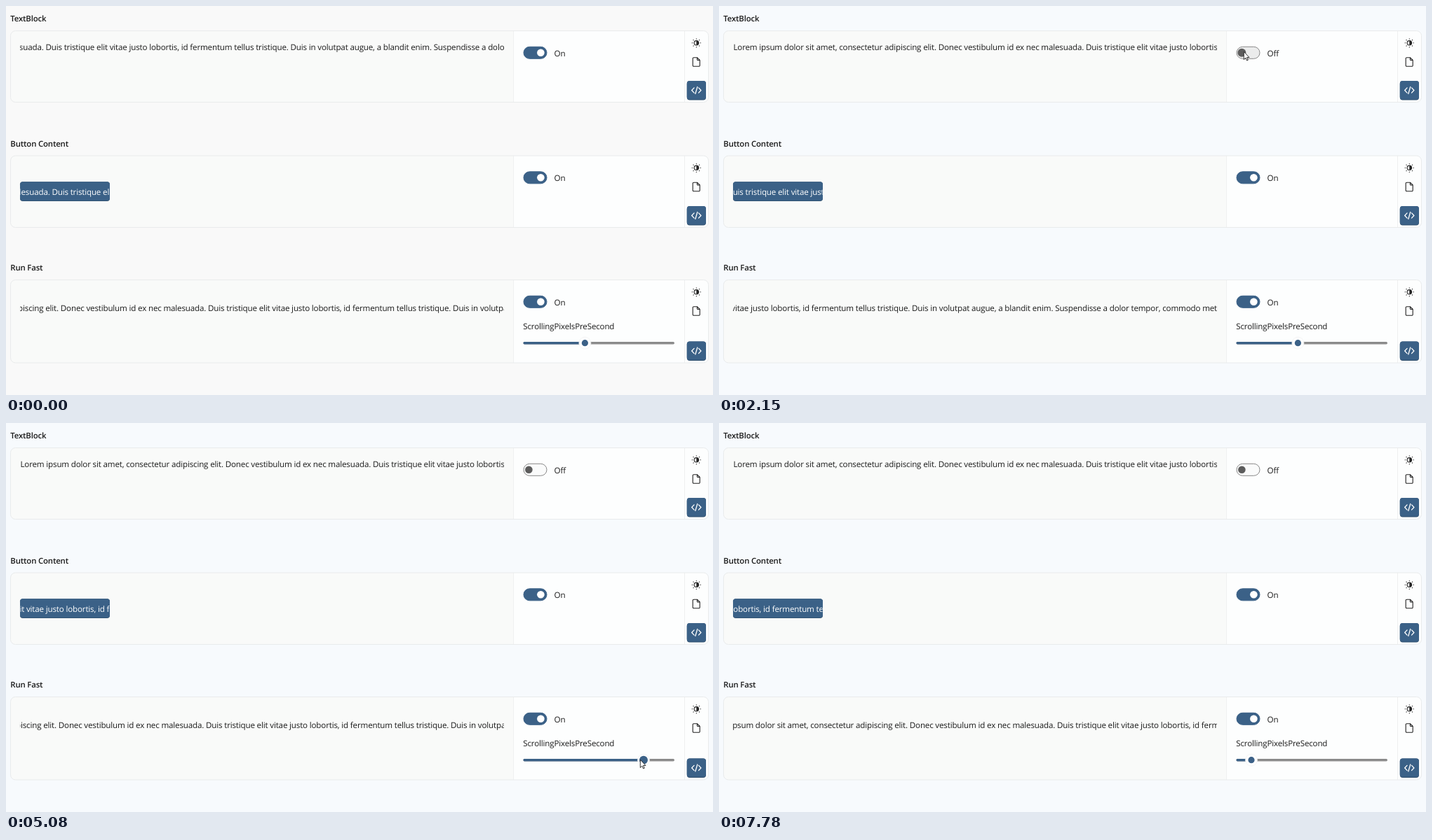
These frames come from a looping animation (1008x556 px, 7850 ms). An HTML page:

```html
<!DOCTYPE html>
<html lang="en">
<head>
<meta charset="utf-8">
<title>Scrolling text</title>
<style>
  html, body { margin: 0; width: 100%; height: 100%; overflow: hidden; background: #f9f9f9; }
  svg { display: block; width: 1008px; height: 556px; }
  text { font: 11.6px "Open Sans", "Noto Sans", sans-serif; letter-spacing: -.165px; fill: #1b1b1b; text-rendering: geometricPrecision; white-space: pre; }
  .title { font-size: 11.4px; font-weight: 600; }
  .light { fill: #fff; }
  .tip { font-size: 12.5px; text-anchor: middle; }
  .line { fill: none; stroke: #222; stroke-width: 1.1; stroke-linejoin: round; stroke-linecap: round; }
</style>
</head>
<body>
<svg id="stage" viewBox="0 0 1008 556"></svg>
<script>
const LOOP = 7850;
const ACCENT = '#3b6187';
const ACCENT_HOVER = '#4b6e91';
const REST_X = 20.5;
const PX_PER_UNIT = 0.842;
const TOGGLE_AT = 1500;
const TRACK = { x: 737.5, y: 480, height: 3.4, rx: 1.7 };
const PASSAGE = 'Lorem ipsum dolor sit amet, consectetur adipiscing elit. Donec vestibulum id ex nec malesuada. ' +
  'Duis tristique elit vitae justo lobortis, id fermentum tellus tristique. Duis in volutpat augue, a blandit enim. ' +
  'Suspendisse a dolor tempor, commodo metus vel, dapibus nisl. Nulla id sapien at arcu pretium aliquet. ' +
  'Sed vitae lectus non nibh gravida porta.';

const easeInOut = p => (1 - Math.cos(Math.PI * p)) / 2;
const easeOut = p => Math.sin(Math.PI * p / 2);
const ramp = (t, from, to) => Math.min(1, Math.max(0, (t - from) / (to - from)));
const pulse = (t, from, to, fade = 100) => ramp(t, from, from + fade) - ramp(t, to, to + fade);
const within = (t, from, to) => t >= from && t < to;

const SLIDER_START = 825.4;
const DRAGS = [
  { press: 3540, from: 3700, to: 4390, release: 4620, x: 909, ease: easeInOut },
  { press: 5240, from: 5400, to: 6350, release: 6480, x: 759, ease: easeOut }
];
const POINTER_START = { x: 760, y: 497 };
const POINTER_MOVES = [
  { from: 140, to: 620, x: 708, y: 170 },
  { from: 620, to: 1150, x: 748, y: 65 },
  { from: 2200, to: 2800, x: SLIDER_START - 5, y: 481 }
];

const stage = document.getElementById('stage');

function set(node, attrs) {
  for (const name in attrs) node.setAttribute(name, attrs[name]);
}

function add(tag, attrs, parent = stage, content) {
  const node = document.createElementNS('http://www.w3.org/2000/svg', tag);
  set(node, attrs);
  if (content) node.textContent = content;
  parent.append(node);
  return node;
}

function label(x, y, content, cls = '', parent = stage) {
  return add('text', { x, y, class: cls }, parent, content);
}

function place(node, x, y) {
  node.setAttribute('transform', `translate(${x} ${y})`);
}

function marquee(id, x, width, baseline, cls) {
  const clip = add('clipPath', { id });
  add('rect', { x, y: baseline - 16, width, height: 24 }, clip);
  const group = add('g', { 'clip-path': `url(#${id})` });
  return label(0, baseline, PASSAGE, cls, group);
}

function accentBox(x, y, width, height, parent) {
  add('rect', { x, y, width, height, rx: 4, fill: '#2f4e6d' }, parent);
  add('rect', { x, y, width, height: height - 0.8, rx: 4, fill: ACCENT }, parent);
}

function toggle(cy) {
  return {
    track: add('rect', { x: 738, y: cy - 8.5, width: 33, height: 17, rx: 8.5, fill: ACCENT, stroke: ACCENT }),
    knob: add('circle', { cx: 762.4, cy, r: 5.3, fill: '#fff' }),
    text: label(781.6, cy + 5.1, 'On')
  };
}

function icons(top, bottom) {
  const sun = add('g', { transform: `translate(984.3 ${top + 17.3})` });
  add('circle', { r: 3.2, class: 'line' }, sun);
  add('path', { d: 'M0-3.2A3.2 3.2 0 0 1 0 3.2Z', fill: '#222' }, sun);
  for (let angle = 0; angle < 360; angle += 45) {
    add('path', { d: 'M0-5.7V-6.1', class: 'line', transform: `rotate(${angle})` }, sun);
  }
  add('path', {
    d: 'M-3.7-6.3H1.2L5-2.5V5A1.3 1.3 0 0 1 3.7 6.3H-3.7A1.3 1.3 0 0 1-5 5V-5A1.3 1.3 0 0 1-3.7-6.3ZM1.2-6.3V-3.5A1 1 0 0 0 2.2-2.5H5',
    class: 'line', transform: `translate(984.2 ${top + 44.5})`
  });
  const code = add('g', { transform: `translate(984.3 ${bottom - 17})` });
  accentBox(-13.5, -13.5, 27.2, 27.4, code);
  add('path', { d: 'M-3.2-3.6L-6.6 0L-3.2 3.6M3.2-3.6L6.6 0L3.2 3.6M1.5-5L-1.5 5', class: 'line', style: 'stroke:#fff;stroke-width:1.3' }, code);
}

function panel(title, top, bottom) {
  label(6.3, top - 13.5, title, 'title');
  const frame = { x: 6.5, y: top, width: 995, height: bottom - top, rx: 7 };
  add('rect', { ...frame, fill: '#f9faf9' });
  add('path', { d: `M723.5 ${top}H994.5a7 7 0 0 1 7 7V${bottom - 7}a7 7 0 0 1-7 7H723.5Z`, fill: '#fdfefe' });
  add('path', { d: `M723.5 ${top}V${bottom}M967.5 ${top}V${bottom}`, stroke: '#eff0f0' });
  add('rect', { ...frame, fill: 'none', stroke: '#e9ebec' });
  icons(top, bottom);
  return toggle(top + 31.3);
}

const backdrop = add('rect', { width: 1008, height: 556 });
const firstToggle = panel('TextBlock', 35.5, 137.5);
panel('Button Content', 214, 316.5);
panel('Run Fast', 391.5, 510);

const blockText = marquee('block', 20, 690, 63);
accentBox(20, 251.2, 128, 27.8);
const buttonText = marquee('button', 20.5, 127, 270, 'light');
const fastText = marquee('fast', 20, 690, 436);

label(737.3, 461.6, 'ScrollingPixelsPreSecond');
add('rect', { ...TRACK, width: 215.5, fill: '#8b8b8b' });
const filled = add('rect', { ...TRACK, fill: ACCENT });
const thumb = add('g', {});
add('circle', { r: 8.5, fill: '#fff', stroke: '#f0f1f1', 'stroke-width': 0.8 }, thumb);
const dot = add('circle', { fill: ACCENT }, thumb);

const tip = add('g', {});
const tipBox = add('rect', { y: 432.5, height: 25, rx: 3.5, fill: '#f9f9f9', stroke: '#ebebeb' }, tip);
const tipText = label(0, 449.7, '', 'tip', tip);

const pointer = add('g', {});
const glow = add('circle', { r: 10.5, cx: -0.5, cy: 0.8, fill: '#fff500' }, pointer);
add('path', { d: 'M.3 .3V11.6L2.9 9.2L4.6 13L6.3 12.3L4.6 8.5H8Z', fill: '#fff', stroke: '#222', 'stroke-width': 0.9, 'stroke-linejoin': 'round' }, pointer);

function thumbX(t) {
  return DRAGS.reduce((x, drag) => x + (drag.x - x) * drag.ease(ramp(t, drag.from, drag.to)), SLIDER_START);
}

const sliderValue = x => Math.round((x - 745.4) * 2.5);

// The text rests while the slider is dragged and restarts when the drag ends.
function fastOffset(t) {
  const drag = DRAGS.filter(d => t >= d.from).pop();
  const restart = drag ? drag.to : -1394;
  return REST_X - sliderValue(thumbX(t)) * PX_PER_UNIT * Math.max(0, t - restart) / 1000;
}

function drawToggle(t) {
  const on = t < TOGGLE_AT;
  const hover = within(t, 1120, 2240);
  const onColor = hover ? ACCENT_HOVER : ACCENT;
  set(firstToggle.track, {
    fill: on ? onColor : hover ? '#ebecec' : '#fafbfb',
    stroke: on ? onColor : '#888'
  });
  set(firstToggle.knob, {
    cx: 762.4 - 17 * ramp(t, TOGGLE_AT, TOGGLE_AT + 110),
    r: hover ? 6 : 5.3,
    fill: on ? '#fff' : '#5c5c5c'
  });
  firstToggle.text.textContent = on ? 'On' : 'Off';
}

function drawSlider(t) {
  const x = thumbX(t);
  const pressed = DRAGS.reduce((sum, d) => sum + pulse(t, d.press, d.release), 0);
  filled.setAttribute('width', x - TRACK.x);
  place(thumb, x, 481.7);
  dot.setAttribute('r', 4.6 + 1.4 * pulse(t, 2650, 7560) - 2.2 * pressed);

  const value = String(sliderValue(x));
  const width = value.length * 7 + 14.5;
  const center = thumbX(t + 45);
  tip.setAttribute('opacity', pressed);
  set(tipBox, { x: center - width / 2, width });
  tipText.setAttribute('x', center);
  tipText.textContent = value;
}

// While dragging, the thumb follows the pointer a little late.
function pointerAt(t) {
  const pos = { ...POINTER_START };
  for (const move of POINTER_MOVES) {
    const p = easeInOut(ramp(t, move.from, move.to));
    pos.x += (move.x - pos.x) * p;
    pos.y += (move.y - pos.y) * p;
  }
  const leave = ramp(t, 7480, 7660);
  pos.x += thumbX(t + 85) - SLIDER_START + 4 * leave;
  pos.y += 38 * leave;
  return pos;
}

function drawPointer(t) {
  const { x, y } = pointerAt(t);
  place(pointer, x, y);
  pointer.setAttribute('visibility', within(t, 140, 7660) ? 'visible' : 'hidden');
  const pressed = within(t, TOGGLE_AT - 70, TOGGLE_AT + 20) || DRAGS.some(d => within(t, d.press, d.release));
  glow.setAttribute('opacity', pressed ? 0.72 : 0);
}

function draw(t) {
  backdrop.setAttribute('fill', t < TOGGLE_AT ? '#f9f9f9' : '#f7fafd');
  place(blockText, t < TOGGLE_AT ? -446 - 0.025 * t : REST_X, 0);
  place(buttonText, -437 - 0.02515 * t, 0);
  place(fastText, fastOffset(t), 0);
  drawToggle(t);
  drawSlider(t);
  drawPointer(t);
}

const start = performance.now();
function tick() {
  draw((performance.now() - start) % LOOP);
  requestAnimationFrame(tick);
}
tick();
</script>
</body>
</html>
```
